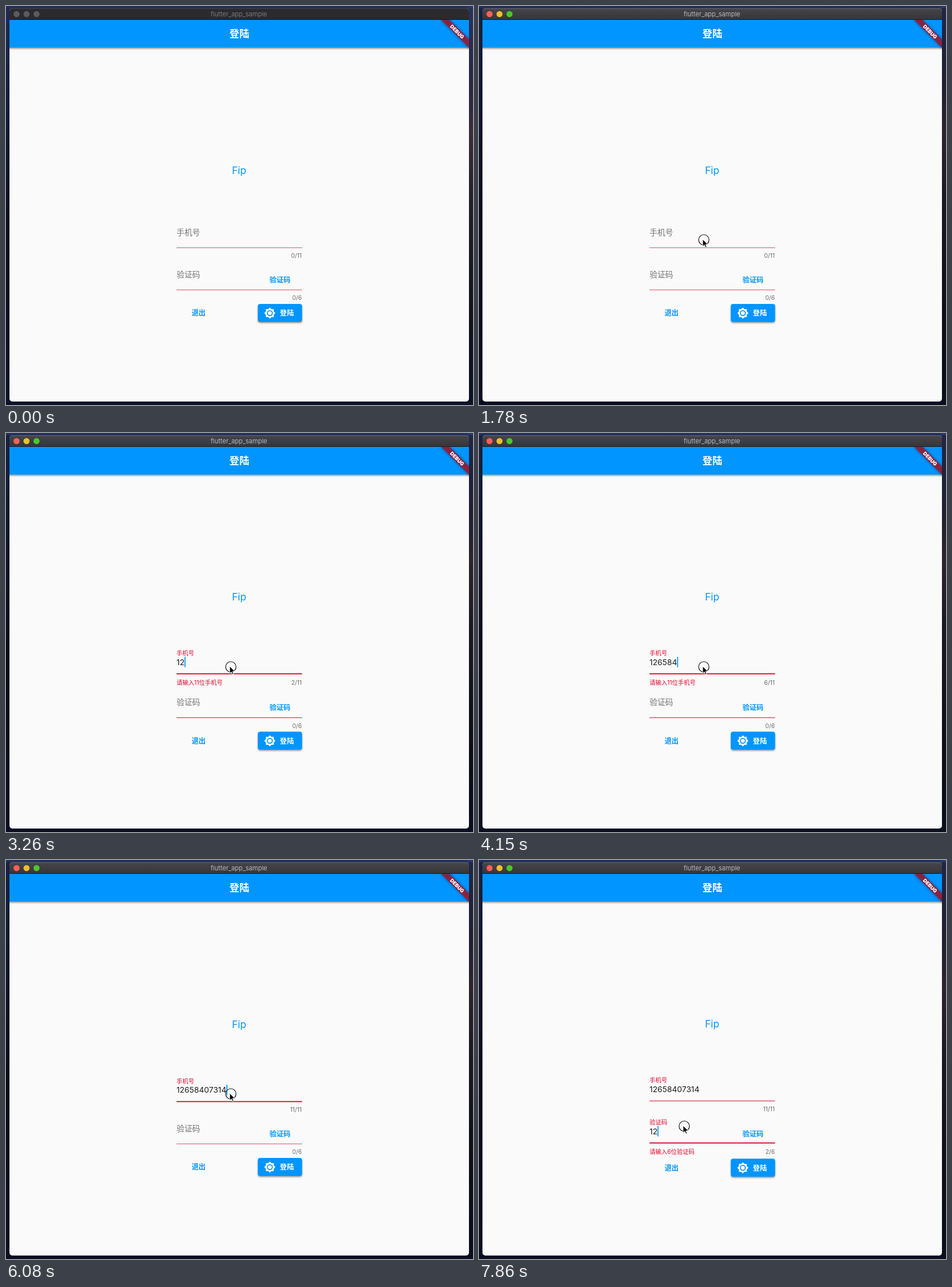
Animation, 810 px wide and 691 px high, one loop 8 s. Source, as an HTML page:

```html
<!DOCTYPE html>
<html lang="zh-CN">
<head>
<meta charset="utf-8">
<style>
html, body { margin: 0; width: 100%; height: 100%; overflow: hidden; background: #0b1228; }
svg { display: block; width: 810px; height: 691px; font-family: Inter, "Noto Sans CJK SC", "Noto Sans CJK", sans-serif; }
</style>
</head>
<body>
<svg viewBox="0 0 810 691">
  <defs>
    <linearGradient id="sky" x2="0" y2="1">
      <stop stop-color="#22305f"/><stop offset=".22" stop-color="#152046"/>
      <stop offset=".55" stop-color="#090f25"/><stop offset="1" stop-color="#0b1330"/>
    </linearGradient>
    <linearGradient id="rock" x2="0" y2="1">
      <stop stop-color="#2a3868"/><stop offset=".2" stop-color="#302c48"/><stop offset=".32" stop-color="#40333f"/>
      <stop offset=".5" stop-color="#262230"/><stop offset=".8" stop-color="#13141f"/><stop offset="1" stop-color="#0e152c"/>
    </linearGradient>
    <linearGradient id="barOn" x2="0" y2="1">
      <stop stop-color="#464549"/><stop offset="1" stop-color="#363539"/>
    </linearGradient>
    <clipPath id="win"><rect x="6" y="4" width="797" height="681" rx="5"/></clipPath>
    <clipPath id="app"><rect x="6" y="24" width="797" height="661"/></clipPath>
    <filter id="soft" x="-30%" y="-60%" width="160%" height="220%"><feGaussianBlur stdDeviation="1.5"/></filter>
    <filter id="wide" x="-30%" y="-100%" width="160%" height="300%"><feGaussianBlur stdDeviation="3"/></filter>
  </defs>
  <rect width="810" height="691" fill="url(#sky)"/>
  <rect x="800" width="10" height="691" fill="url(#rock)"/>
  <rect id="shade" y="4" width="810" height="687" fill="#000"/>
  <g clip-path="url(#win)">
    <rect x="6" y="4" width="797" height="681" fill="#fafafa"/>
    <g id="bar"></g>
    <g clip-path="url(#app)">
      <rect x="0" y="26" width="810" height="48" opacity=".4" filter="url(#soft)"/>
      <rect x="6" y="24" width="797" height="48" fill="#0095ff"/>
      <text x="404.7" y="54.3" font-size="17.1" font-weight="600" fill="#fff" text-anchor="middle">登陆</text>
      <g transform="translate(803 24) rotate(45) scale(.855)">
        <rect x="-40" y="28" width="80" height="12" opacity=".5" filter="url(#wide)"/>
        <rect x="-40" y="28" width="80" height="12" fill="#a01c34" opacity=".85"/>
        <text y="37.7" font-size="10.2" font-weight="900" fill="#fff" text-anchor="middle">DEBUG</text>
      </g>
    </g>
    <g id="form"></g>
  </g>
  <g id="mouse">
    <circle r="9" fill="none" stroke="#111" stroke-width="1.2"/>
    <path d="M-2-1V11.5L1 8.7l2 4.6 2-.9-2-4.5H7.2Z" fill="#000" stroke="#fff" stroke-width=".9"/>
  </g>
</svg>
<script>
const LOOP = 8000, LEFT = 295.7, RIGHT = 513;
const BLUE = '#0095ff', RED = '#e2062c', GREY = '#757575';
const PHONE = '12658407314', CODE = '12';
const $ = id => document.getElementById(id);
const pen = document.createElement('canvas').getContext('2d');

// Each track is a list of [start, value]; the value holds until the next start.
const phoneKeys = [2670, 3260, 3410, 3700, 3850, 4150, 4450, 4600, 5040, 5640, 5790];
const codeKeys = [7260, 7860];
const tracks = {
  phoneFloat: [[2080, .5], [2230, 1]],
  phoneHint: [[2230, .5], [2370, 1]],
  phoneError: [[2670, .5], [2810, 1], [5790, .7], [5930, .3], [6080, 0]],
  codeFloat: [[6820, .5], [6970, 1]],
  codeHint: [[6970, .5], [7120, 1]],
  codeError: [[7260, .5], [7410, 1]],
};
const path = [
  [150, [586, 194]], [300, [573, 194]], [590, [566, 183]], [890, [552, 215]], [1040, [535, 259]],
  [1340, [470, 330]], [1490, [415, 395]], [1640, [386, 420]], [1780, [390, 405]],
  [6380, [383, 422]], [6530, [368, 440]], [6680, [356, 461]],
];

const at = (track, t, first = 0) => track.reduce((v, [start, next]) => t >= start ? next : v, first);
const typed = (text, keys, t) => text.slice(0, keys.filter(k => t >= k).length);
const mix = (a, b, f) => a + (b - a) * f;

// y is the middle of the line of text.
function label(str, x, y, size, fill, { anchor = 'start', weight = 400, opacity = 1 } = {}) {
  return `<text x="${x}" y="${y + size * .37}" font-size="${size}" fill="${fill}" text-anchor="${anchor}"
    font-weight="${weight}" opacity="${opacity}">${str}</text>`;
}

function box(x, y, w, h, fill, extra = '') {
  return `<rect x="${x}" y="${y}" width="${w}" height="${h}" fill="${fill}" ${extra}/>`;
}

function textWidth(str) {
  pen.font = '13.7px Inter, sans-serif';
  return pen.measureText(str).width;
}

function field(o) {
  const f = o.float, y = o.y;
  let out = label(o.name, LEFT, mix(y, y - 9, f), mix(13.7, 10.26, f), f ? RED : GREY);
  if (o.text) out += label(o.text, LEFT, y + 6.3, 13.7, '#1d1d1d');
  else if (o.hint) out += label(o.hintText, LEFT, y + 7, 13.7, GREY, { opacity: o.hint });
  if (o.focus && f === 1) {
    const x = o.text ? LEFT + textWidth(o.text) : LEFT - .5;
    out += box(x, y - 3, 1.7, 18, BLUE, o.text ? '' : 'opacity=".6"');
  }
  out += o.focus
    ? box(LEFT, y + 25.5, 217.7, 1.8, RED)
    : box(LEFT, y + 26, 217.7, 1.2, RED, `opacity="${o.lineAlpha}"`);
  if (o.error) out += label(o.errorText, LEFT, o.errorY, 10.26, RED, { opacity: o.error });
  return out + label(`${o.text.length}/${o.max}`, RIGHT, o.countY, 10.26, '#6c6c6c', { anchor: 'end' });
}

function titleBar(active) {
  const dots = active ? ['#ff5f57', '#efbe2d', '#4cc52b'] : Array(3).fill('#5b5a5d');
  return box(6, 4, 797, 20, active ? 'url(#barOn)' : '#2b2a2e')
    + box(6, 4, 797, .8, active ? '#727174' : '#49484c')
    + box(6, 23.2, 797, .8, '#161619')
    + dots.map((c, i) => `<circle cx="${18.3 + i * 17.3}" cy="14" r="5.3" fill="${c}"/>`).join('')
    + label('flutter_app_sample', 404, 14, 11, active ? '#b9b8bb' : '#7b7a7d', { anchor: 'middle' });
}

function form(t) {
  const s = {};
  for (const key in tracks) s[key] = at(tracks[key], t);
  const e1 = s.phoneError, e2 = s.codeError, lift = -1.3 * (e1 + e2), drop = 1.3 * (e1 + e2);
  const bold = { anchor: 'middle', weight: 600 };
  const lineAlpha = e1 || e2 ? .85 : .6;
  return label('Fip', 404.3, 285 + lift, 17.1, BLUE, { anchor: 'middle' })
    + field({
      name: '手机号', hintText: '请输入手机号', errorText: '请输入11位手机号', max: 11,
      y: 392 + lift, errorY: 432, countY: 432.6 - .6 * e1 - 1.3 * e2, lineAlpha,
      text: typed(PHONE, phoneKeys, t), focus: t >= 2080 && t < 6820,
      float: s.phoneFloat, hint: s.phoneHint, error: e1,
    })
    + field({
      name: '验证码', hintText: '请输入验证码', errorText: '请输入6位验证码', max: 6,
      y: 465 + 1.4 * e1 - 1.3 * e2, errorY: 505, countY: 505.6 + 1.4 * e1 - .5 * e2, lineAlpha,
      text: typed(CODE, codeKeys, t), focus: t >= 6820,
      float: s.codeFloat, hint: s.codeHint, error: e2,
    })
    + label('验证码', 475.2, 474.6 + 1.4 * e1, 12.1, BLUE, bold)
    + `<g transform="translate(0 ${drop})">`
    + label('退出', 334, 532, 12.1, BLUE, bold)
    + box(437, 518, 76.5, 31, '#000', 'rx="4" opacity=".4" filter="url(#soft)"')
    + box(436.8, 516, 76.7, 31.3, BLUE, 'rx="4"')
    + `<g transform="translate(457.6 531.8) scale(.855)">
        <path d="M8-3.31V-8H3.31L0-11.31-3.31-8H-8v4.69L-11.31 0-8 3.31V8h4.69L0 11.31 3.31 8H8V3.31L11.31 0Z" fill="#fff"/>
        <circle r="5" fill="#fff" stroke="${BLUE}" stroke-width="2"/></g>`
    + label('登陆', 487.2, 532, 12.1, '#fff', bold) + '</g>';
}

function fill(id, html) {
  const el = $(id);
  if (el.last !== html) el.innerHTML = el.last = html;
}

function draw() {
  const t = performance.now() % LOOP, active = t >= 590, spot = at(path, t, null);
  $('shade').setAttribute('opacity', active ? .3 : .1);
  fill('bar', titleBar(active));
  fill('form', form(t));
  $('mouse').setAttribute('visibility', spot ? 'visible' : 'hidden');
  if (spot) $('mouse').setAttribute('transform', `translate(${spot})`);
  requestAnimationFrame(draw);
}
draw();
</script>
</body>
</html>
```
